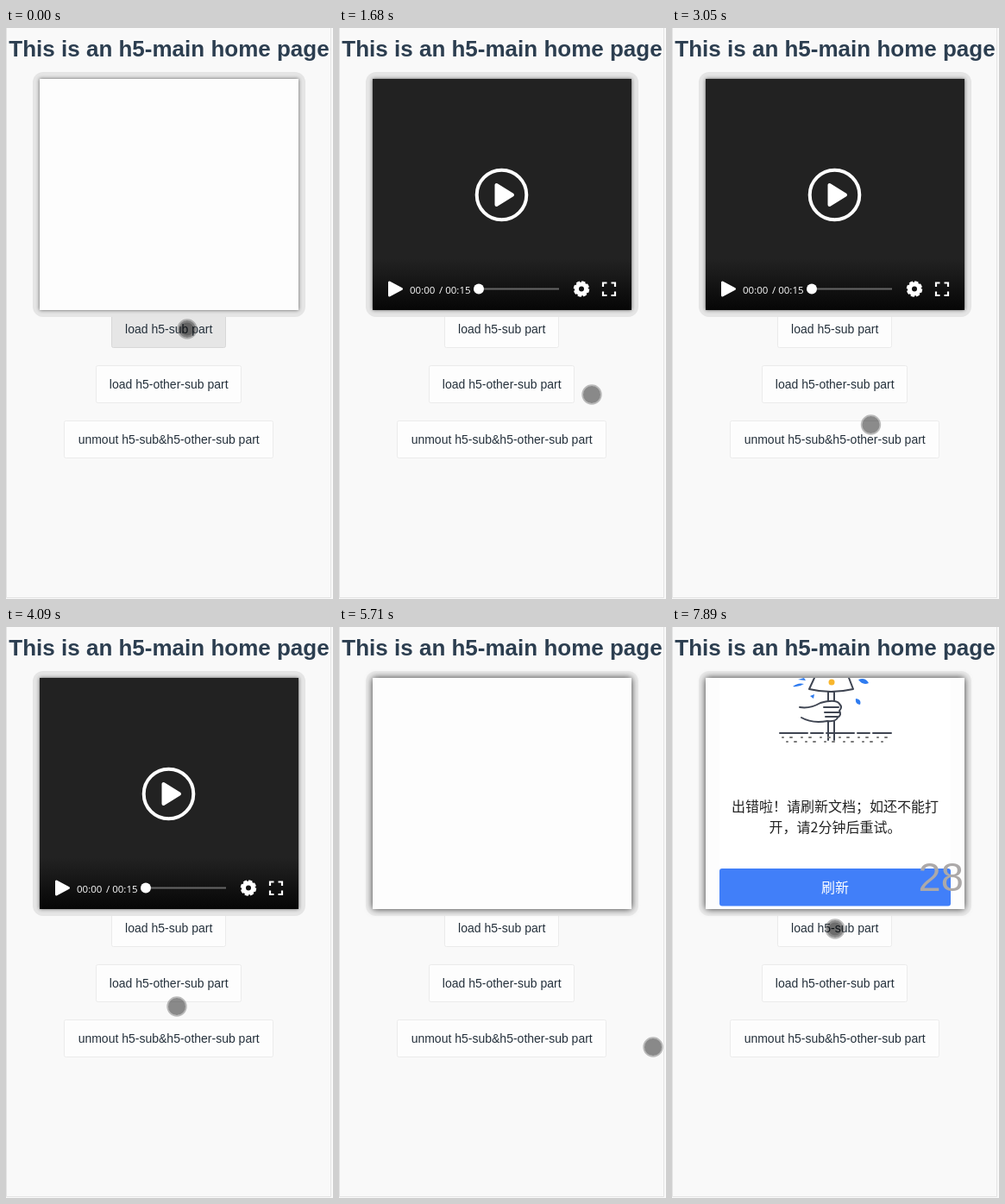
An HTML page for the animation above (8 s loop, 379 by 662 pixels).

```html
<!DOCTYPE html>
<html lang="en">
<head>
<meta charset="utf-8">
<title>h5-main</title>
<style>
html, body { margin: 0; width: 100%; height: 100%; overflow: hidden; background: #f9f9f9; }
svg { display: block; width: 379px; height: 662px; font-family: "Liberation Sans", Arial, sans-serif; }
.cjk { font-family: "Noto Sans CJK SC", "Noto Sans CJK", sans-serif; }
.button rect { fill: #fdfdfd; stroke: #ebebeb; }
.button text { font-size: 14px; fill: #24303b; text-anchor: middle; }
.pressed rect { fill: #e6e6e6; stroke: #d8d8d8; }
#ring { fill: #e5e5e5; }
#box { fill: #fdfdfd; filter: drop-shadow(0 0 2px #0009); }
.deep #ring { fill: #ededed; }
.deep #box { filter: drop-shadow(0 0 4px #000c); }
.ink { fill: none; stroke: #3f4552; stroke-width: 2; stroke-linecap: round; stroke-linejoin: round; }
</style>
</head>
<body>
<svg viewBox="0 0 379 662">
  <defs>
    <clipPath id="inside"><rect x="39" y="59" width="300" height="268"/></clipPath>
    <linearGradient id="fade" x2="0" y2="1">
      <stop offset="0" stop-color="#222"/><stop offset="1" stop-color="#060606"/>
    </linearGradient>
  </defs>
  <rect width="379" height="662" fill="#f9f9f9"/>
  <path d="M.5 0V660.5H376.5V0" fill="none" stroke="#e3e3e3"/>
  <text x="189" y="33" font-size="26" font-weight="bold" fill="#2c3e50" text-anchor="middle">This is an h5-main home page</text>

  <g id="buttons"></g>

  <g id="frame">
    <rect id="ring" x="31" y="51" width="316" height="284" rx="12"/>
    <rect id="box" x="39" y="59" width="300" height="268"/>
  </g>

  <g clip-path="url(#inside)">
    <g id="video">
      <rect x="39" y="59" width="300" height="268" fill="#222"/>
      <g id="bar" fill="#fff">
        <rect x="39" y="268" width="300" height="59" fill="url(#fade)"/>
        <path d="M58.500 295V310L72.500 302.500Z" stroke="#fff" stroke-width="3" stroke-linejoin="round"/>
        <g font-family="'Open Sans', 'Noto Sans', sans-serif" font-size="11.500">
          <text x="82" y="307.500">00:00</text><text x="116" y="307.500">/ 00:15</text>
        </g>
        <path d="M162 302.500H255" stroke="#666" stroke-width="2"/>
        <circle cx="162" cy="302.500" r="6"/>
        <circle cx="281" cy="302.500" r="5.500" fill="none" stroke="#fff" stroke-width="5"/>
        <circle cx="281" cy="302.500" r="8" fill="none" stroke="#fff" stroke-width="2.500" stroke-dasharray="4.200 2.080"/>
        <path d="M306 300V295.500H310.500M315.500 295.500H320V300M320 305.500V310H315.500M310.500 310H306V305.500" fill="none" stroke="#fff" stroke-width="2.200"/>
      </g>
      <g id="play" stroke="#fff" stroke-width="4" stroke-linejoin="round">
        <circle cx="188.500" cy="193.500" r="28.800" fill="none"/>
        <path d="M182.500 182V205L201 193.500Z" fill="#fff"/>
      </g>
    </g>

    <g id="loading">
      <rect x="164" y="119" width="50" height="50" rx="2" fill="#ee6f4d"/>
      <text class="cjk" x="189" y="209" font-size="18" fill="#222" text-anchor="middle">多人协作 · 在线Quillo</text>
      <text class="cjk" x="100" y="293" font-size="20.500" fill="#c6c6c6">技术源自</text>
      <text x="190" y="295" font-size="26" fill="#e8362f">QZM</text>
      <circle cx="264" cy="286" r="11" fill="#e8362f"/>
      <g fill="none" stroke-width="4">
        <circle cx="189" cy="259" r="16" stroke="#e6e6e6"/>
        <path id="arc" d="M199.300 246.700A16 16 0 0 1 189 275" stroke="#417ff9"/>
      </g>
    </g>

    <g id="error">
      <rect x="55" y="59" width="268" height="268" fill="#fff"/>
      <path class="ink" d="M165 59L159 72Q184 78 210 72L205 59M181 75V87M188 75V87M181 108V131M188 108V131"/>
      <circle cx="185" cy="64" r="3.500" fill="#f8b62d"/>
      <path class="ink" fill="#fff" style="fill:#fff" d="M148 93Q160 95 172 88Q190 83 194 89Q198 93 194 97Q197 102 192 105Q190 110 180 109Q162 112 150 105"/>
      <path class="ink" d="M176 93H193M177 99H194M178 104H192"/>
      <path d="M140 69Q146 64 153 66Q147 70 140 69ZM146 61L153 59L155 62ZM216 61Q224 58 228 65Q221 68 216 61ZM213 83Q220 84 218 90Q212 90 213 83ZM160 80L165 78L164 83Z" fill="#2f7cf0"/>
      <path class="ink" d="M125 123H254" stroke-dasharray="32 4 14 4"/>
      <path class="ink" d="M128 128H252M133 133H246" stroke-dasharray="1 8 2 11" style="stroke:#777"/>
      <g class="cjk" font-size="16" fill="#222" text-anchor="middle">
        <text x="189" y="214">出错啦！请刷新文档；如还不能打</text>
        <text x="189" y="238">开，请2分钟后重试。</text>
        <rect x="55" y="280" width="268" height="43.500" rx="3" fill="#417ff9"/>
        <text x="189" y="308" fill="#fff" font-weight="500">刷新</text>
      </g>
    </g>
    <text id="count" x="285.500" y="305.500" font-size="47" fill="#aca9a9"></text>
  </g>

  <g id="cursor">
    <circle r="10" fill="#000" fill-opacity=".45"/>
    <circle r="10.700" fill="none" stroke="#6d6d6d" stroke-opacity=".46" stroke-width="2"/>
    <circle id="press" r="7.500" fill="#000" fill-opacity=".22"/>
  </g>
</svg>
<script>
const LOOP = 8000, STEP = 120;
const $ = id => document.getElementById(id);

$('buttons').innerHTML = [
  ['load h5-sub part', 133, 327],
  ['load h5-other-sub part', 169, 391],
  ['unmout h5-sub&amp;h5-other-sub part', 243, 455]
].map(([label, w, y]) => `<g class="button">
  <rect x="${Math.round(188.5 - w / 2) + 0.5}" y="${y + 0.5}" width="${w - 1}" height="43" rx="2"/>
  <text x="188.7" y="${y + 27}">${label}</text></g>`).join('');
const firstButton = $('buttons').firstElementChild;

// Pointer moves: start time, number of steps, end x, end y
const moves = [
  [120, 4, 293, 406], [1530, 1, 293, 411], [1680, 1, 293, 425],
  [1800, 3, 216, 210], [2180, 1, 213, 196], [2420, 1, 214, 233],
  [2570, 4, 239, 443], [3050, 2, 222, 477], [3580, 1, 222, 478],
  [3850, 3, 198, 440], [4340, 4, 187, 362], [4850, 2, 184, 400],
  [5090, 1, 190, 411], [5350, 2, 328, 477], [5590, 2, 364, 487],
  [6480, 1, 364, 486], [6630, 1, 290, 399], [6780, 4, 189, 350]
];

function pointer(t) {
  let x = 210, y = 349;
  for (const [start, steps, endX, endY] of moves) {
    if (t < start) break;
    const k = Math.min(1, (Math.floor((t - start) / STEP) + 1) / steps);
    x += (endX - x) * k;
    y += (endY - y) * k;
  }
  return [x, y];
}

const within = (t, from, to) => t >= from && t < to;
const show = (id, on) => $(id).setAttribute('display', on ? 'inline' : 'none');

function counter(t) {
  if (within(t, 730, 880)) return 30;
  if (t < 5980) return '';
  return t < 7020 ? 30 : t < 7890 ? 29 : 28;
}

function draw(t) {
  $('cursor').setAttribute('transform', `translate(${pointer(t)})`);
  show('press', t < 120 || t >= 7140);
  firstButton.classList.toggle('pressed', t < 120);
  $('frame').classList.toggle('deep', t >= 5590);
  show('video', within(t, 880, 5590));
  show('bar', t >= 1530);
  show('play', t >= 1000 && !within(t, 2180, 2420));
  show('loading', within(t, 6630, 7770));
  show('error', t >= 7770);
  const turns = Math.max(0, Math.floor((t - 6660) / STEP));
  $('arc').setAttribute('transform', `rotate(${turns * 43} 189 259)`);
  $('count').textContent = counter(t);
}

const begin = performance.now();
function tick() {
  draw((performance.now() - begin) % LOOP);
  requestAnimationFrame(tick);
}
tick();
</script>
</body>
</html>
```
